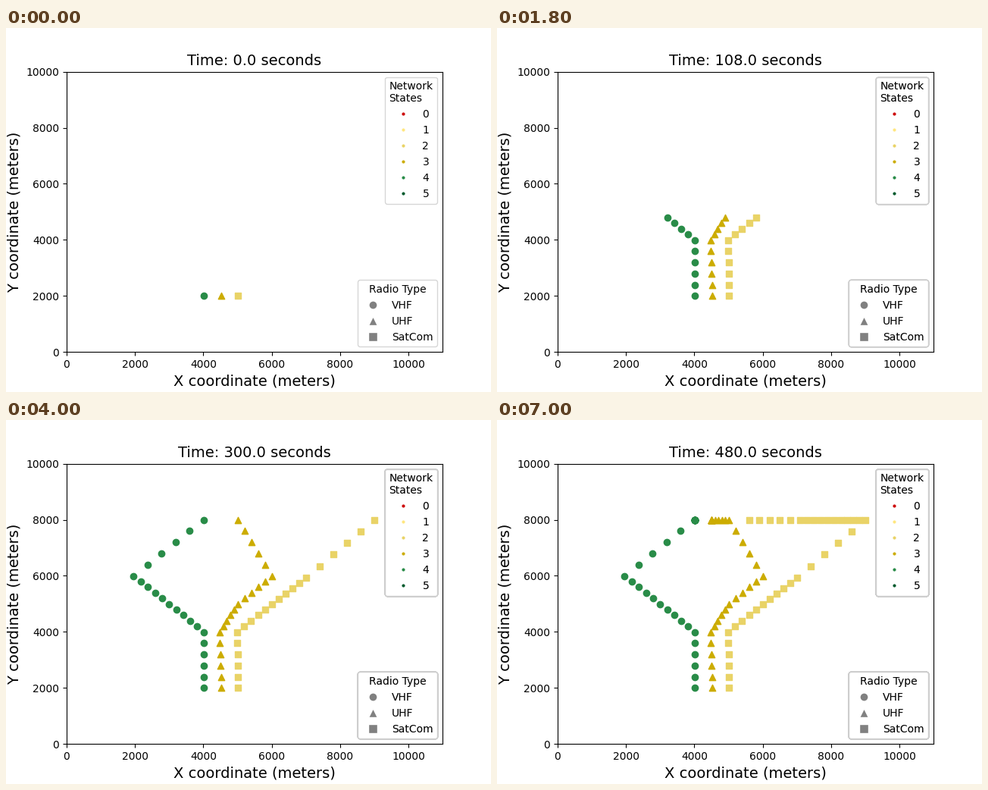
These frames come from a looping animation (640x480 px, 7.2 s). A matplotlib script:

```python
import numpy as np
import matplotlib.pyplot as plt
from matplotlib.animation import FuncAnimation
from matplotlib.legend import Legend
from matplotlib.lines import Line2D
from matplotlib.patches import FancyBboxPatch
from matplotlib.transforms import IdentityTransform

FRAMES = 36
STEP_MS = 200
LEG = 5  # frames from one waypoint to the next
DRIFT = np.array([5, -5])  # meters off the planned route

STATE_COLORS = ["#cc0000", "#ffe680", "#e9d367", "#ccac00", "#298c48", "#005a2d"]
MARKERS = {"VHF": "o", "UHF": "^", "SatCom": "s"}
STATES = {"VHF": 4, "UHF": 3, "SatCom": 2}
WAYPOINTS = {
    "VHF": [(4000, 2000), (4000, 4000), (3000, 5000), (1950, 6000), (4000, 8000)],
    "UHF": [(4520, 2000), (4475, 4000), (5000, 5000), (6000, 6000), (5000, 8000),
            (4500, 8000)],
    "SatCom": [(5010, 2000), (4990, 4000), (6000, 5000), (7000, 5940), (9000, 8000),
               (8100, 8000), (7100, 8000), (5600, 8000)],
}

fig, ax = plt.subplots(figsize=(6.4, 4.8), dpi=100)
ax.set_xlim(0, 11000)
ax.set_ylim(0, 10000)
ax.set_xlabel("X coordinate (meters)", fontsize=14)
ax.set_ylabel("Y coordinate (meters)", fontsize=14)
title = ax.set_title("Time: 0.0 seconds", fontsize=14)


def track(points):
    """Position at every frame; a radio rests at its last waypoint."""
    steps = LEG * np.arange(len(points))
    return DRIFT + np.column_stack(
        [np.interp(np.arange(FRAMES), steps, axis) for axis in zip(*points)])


def seconds(k):
    """Clock of 12 s a frame; the long fourth leg runs at double pace."""
    return 12.0 * (k + min(max(k - 3 * LEG, 0), LEG))


def key(marker, color, size):
    return Line2D([], [], ls="", marker=marker, color="w",
                  markerfacecolor=color, markersize=size)


def add_legends(zorder):
    states = Legend(ax, [key("o", c, 4) for c in STATE_COLORS],
                    [str(i) for i in range(len(STATE_COLORS))],
                    loc="upper right", title="Network\nStates")
    radios = Legend(ax, [key(m, "gray", 8) for m in MARKERS.values()],
                    list(MARKERS), loc="lower right", title="Radio Type")
    for legend in (states, radios):
        legend.set_zorder(zorder)
        ax.add_artist(legend)
    return states, radios


def add_box(legend):
    x, y, w, h = legend.get_window_extent().bounds
    box = FancyBboxPatch((x, y), w, h,
                         boxstyle="round,pad=0,rounding_size=0.2",
                         mutation_scale=10 * fig.dpi / 72, snap=True,
                         facecolor="w", edgecolor="0.8", linewidth=1,
                         alpha=0.8, zorder=4, transform=IdentityTransform())
    return ax.add_artist(box)


tracks = {name: track(points) for name, points in WAYPOINTS.items()}
trails = {name: ax.scatter([], [], marker=marker, color=STATE_COLORS[STATES[name]])
          for name, marker in MARKERS.items()}

# A new translucent legend lands on the old ones at every step, so the
# borders grow heavier; only the top two need their text.
under = add_legends(5)
top = add_legends(6)
fig.canvas.draw()
boxes = [[add_box(legend) for legend in top] for _ in range(FRAMES - 2)]


def update(k):
    title.set_text(f"Time: {seconds(k):.1f} seconds")
    for name, trail in trails.items():
        trail.set_offsets(tracks[name][:k + 1])
    for legend in under:
        legend.set_visible(k >= 1)
    for i, pair in enumerate(boxes):
        for box in pair:
            box.set_visible(i < k - 1)
    return [title, *trails.values()]


anim = FuncAnimation(fig, update, frames=FRAMES, interval=STEP_MS,
                     repeat=True, repeat_delay=0, blit=False)
plt.show()
```
